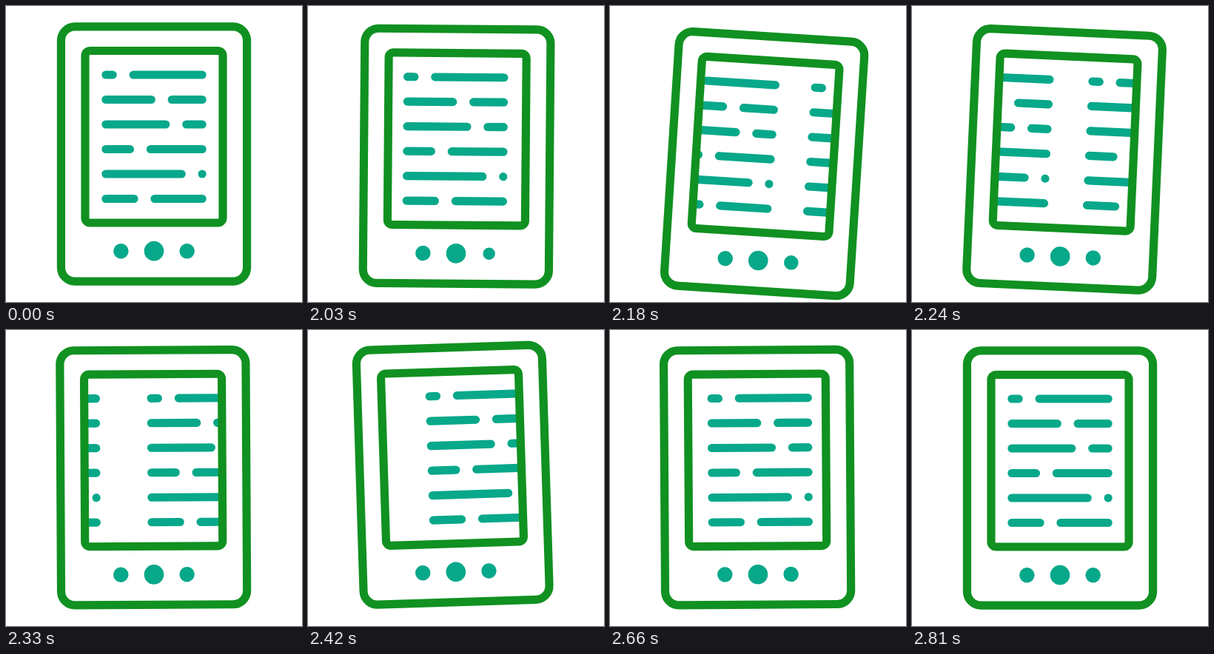
An HTML page with a canvas that plays this animation: 400x400 px, repeating every 2840 ms.

```html
<!DOCTYPE html>
<html lang="en">
<head>
<meta charset="utf-8">
<title>Reader page turn</title>
<style>
  html, body { margin: 0; width: 100%; height: 100%; overflow: hidden; background: #fff; }
  canvas { display: block; width: 400px; height: 400px; }
</style>
</head>
<body>
<canvas id="stage" width="400" height="400"></canvas>
<script>
const ctx = document.getElementById('stage').getContext('2d');
const LOOP = 2840, START = 2030, STEP = 30;
const GREEN = '#109121', TEAL = '#08a88a';
const K = 400 / 430; // artwork is laid out on a 430 unit grid
const PIVOT = { x: 200, y: 336 };
const LEFT = 145, RIGHT = 285, GAP = 30;
const BREAKS = [155, 211, 232, 180, 255, 186]; // where each text row pauses

// Progress 0..1 between two times along cubic-bezier(x1, 0, x2, 1)
function ease(t, from, to, x1 = .37, x2 = .63) {
  const u = (t - from) / (to - from);
  if (u <= 0) return 0;
  if (u >= 1) return 1;
  let lo = 0, hi = 1, s;
  for (let i = 0; i < 24; i++) {
    s = (lo + hi) / 2;
    const r = 1 - s;
    if (3 * s * r * (r * x1 + s * x2) + s * s * s < u) lo = s; else hi = s;
  }
  return s * s * (3 - 2 * s);
}

// The device is pushed down, swings back past rest, then settles
const settle = t => ease(t, 2490, 2810, .3, .22);
const tilt = t => .066 * ease(t, 1995, 2148) - .102 * ease(t, 2145, 2490, .4, .4) + .036 * settle(t);
const drop = t => 14.4 * ease(t, 1980, 2140) - 19.4 * ease(t, 2130, 2490, .3, .36) + 5 * settle(t);
const press = t => 1 - .4 * (ease(t, 2000, 2060) - ease(t, 2075, 2210));
const oldPage = t => -190 * ease(t, 2000, 2447, .34, .81);
const newPage = t => 186 * (1 - ease(t, 1985, 2795, .25, .295));

function frame(x, y, w, h, r) {
  ctx.beginPath();
  ctx.roundRect(x, y, w, h, r);
  ctx.stroke();
}

function dot(x, r) {
  ctx.beginPath();
  ctx.arc(x, 356, r, 0, Math.PI * 2);
  ctx.fill();
}

function page(shift) {
  ctx.beginPath();
  BREAKS.forEach((stop, i) => {
    const y = 100 + 36 * i;
    for (const [a, b] of [[LEFT, stop], [stop + GAP, RIGHT]]) {
      ctx.moveTo(a + shift, y);
      ctx.lineTo(b + shift + .01, y); // keeps the round cap on a zero-length dash
    }
  });
  ctx.stroke();
}

function draw(t) {
  ctx.setTransform(1, 0, 0, 1, 0, 0);
  ctx.fillStyle = '#fff';
  ctx.fillRect(0, 0, 400, 400);

  ctx.translate(PIVOT.x, PIVOT.y + drop(t));
  ctx.rotate(tilt(t));
  ctx.translate(-PIVOT.x, -PIVOT.y);
  ctx.scale(K, K);
  ctx.lineWidth = 12;
  ctx.lineCap = 'round';

  ctx.save();
  ctx.beginPath();
  ctx.rect(115, 65, 200, 250);
  ctx.clip();
  ctx.strokeStyle = TEAL;
  page(oldPage(t) / K);
  page(newPage(t) / K);
  ctx.restore();

  ctx.strokeStyle = GREEN;
  frame(80, 30, 270, 370, 20);
  frame(115, 65, 200, 250, 7);

  ctx.fillStyle = TEAL;
  dot(167, 11);
  dot(215, 14.3);
  dot(263, 11 * press(t));
}

function tick() {
  const t = performance.now() % LOOP;
  draw(t < START ? 0 : START + Math.floor((t - START) / STEP) * STEP);
  requestAnimationFrame(tick);
}
tick();
</script>
</body>
</html>
```
